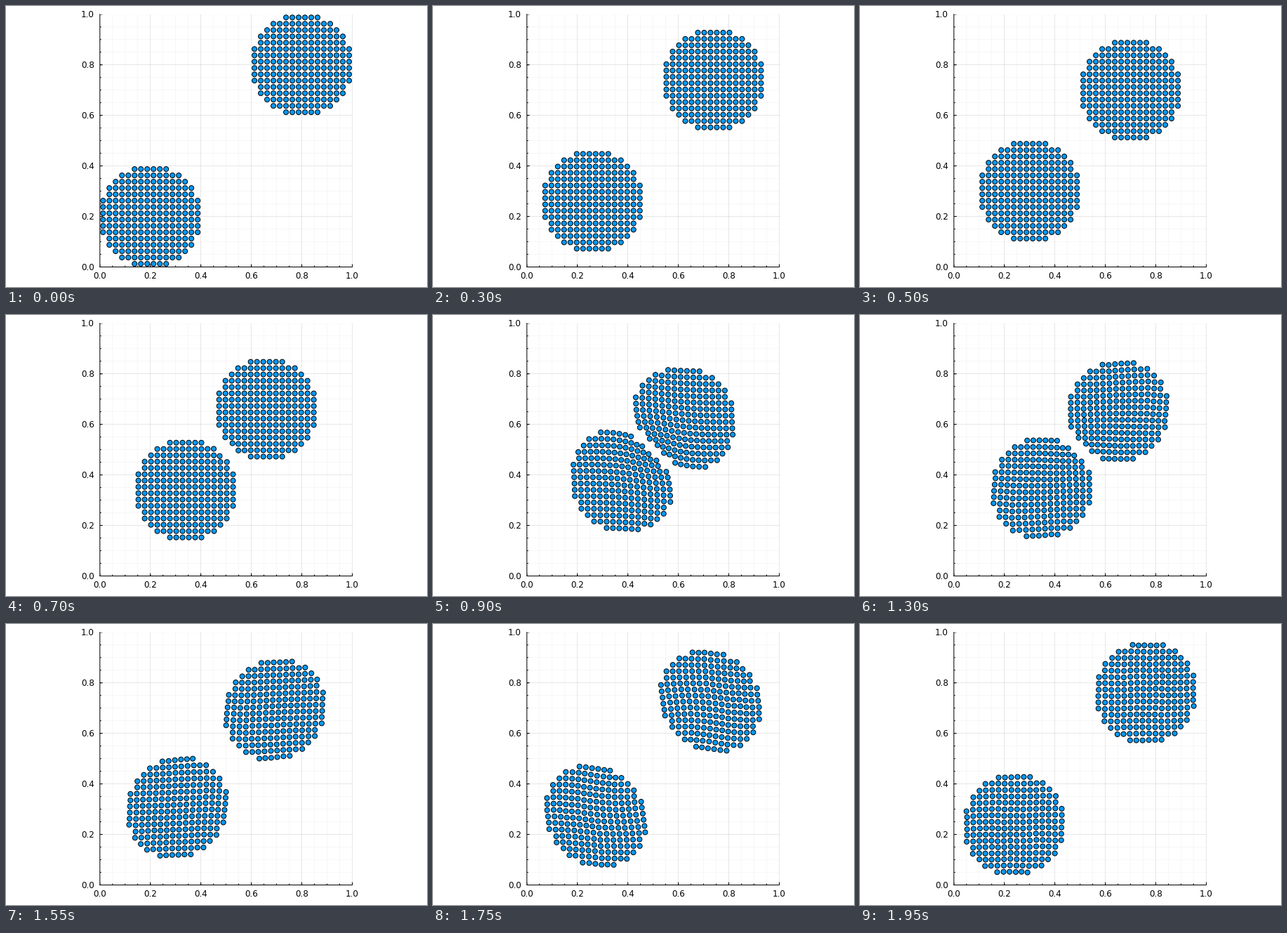
Recreate the animation shown at these times as a matplotlib script. Size 600 by 400 pixels, loop 2000 ms.

```python
"""Two elastic discs collide: material point method on a 20 x 20 grid."""
import numpy as np
import matplotlib.pyplot as plt
from matplotlib.animation import FuncAnimation
from matplotlib.collections import EllipseCollection

FRAMES, INTERVAL = 40, 50
STEPS, DT = 100, 1e-3             # solver steps per frame

CELLS, H = 20, 0.05
NODES = CELLS + 1
SPACING, RADIUS, SPEED = H / 2, 0.2, 0.1
YOUNG, NU, RHO = 1000.0, 0.3, 1000.0
VOLUME = SPACING ** 2
MASS = RHO * VOLUME
EPS = 1e-9
MIN_MASS = 2e-3 * MASS            # lighter nodes carry no force

PX = 0.72                         # points per pixel at 100 dpi
LEFT, RIGHT, TOP, BOTTOM = 133.8, 493.5, 11.8, 371.5


def disc(center):
    """Regular lattice of particles inside a circle."""
    ticks = np.arange(SPACING / 2, 1, SPACING)
    pts = np.stack(np.meshgrid(ticks, ticks, indexing="ij"), -1).reshape(-1, 2)
    return pts[np.hypot(*(pts - center).T) < RADIUS]


def shape(pos):
    """Bilinear weights, their gradients and the four nodes per particle."""
    cell = np.clip(np.floor(pos / H).astype(int), 0, CELLS - 1)
    t = np.clip(pos / H - cell, EPS, 1 - EPS)
    wx, wy = (np.stack([1 - t[:, a], t[:, a]]) for a in (0, 1))
    slope = np.array([-1, 1]) / H
    n = len(pos)
    w = (wx[:, None] * wy[None]).reshape(4, n)
    gx = (slope[:, None, None] * wy[None]).reshape(4, n)
    gy = (wx[:, None] * slope[None, :, None]).reshape(4, n)
    ix = cell[:, 0] + np.arange(2)[:, None, None]
    iy = cell[:, 1] + np.arange(2)[None, :, None]
    return w, gx, gy, (ix * NODES + iy).reshape(4, n)


def simulate(pos, vel):
    """Particle positions at the start of every frame."""
    pos, vel = pos.copy(), vel.copy()
    sxx, syy, sxy = np.zeros((3, len(pos)))
    vol = np.full(len(pos), VOLUME)
    stiff = YOUNG / (1 + NU) / (1 - 2 * NU)
    states = [pos.copy()]
    for step in range(1, (FRAMES - 1) * STEPS + 1):
        w, gx, gy, node = shape(pos)
        flat = node.ravel()

        def to_grid(values):
            return np.bincount(flat, values.ravel(), NODES ** 2)

        mass = to_grid(w * MASS)
        inv = 1 / np.maximum(mass, 1e-30)
        push = np.where(mass > MIN_MASS, inv, 0)
        acc_x = -to_grid(vol * (gx * sxx + gy * sxy)) * push
        acc_y = -to_grid(vol * (gx * sxy + gy * syy)) * push
        ux = to_grid(w * MASS * vel[:, 0]) * inv + DT * acc_x
        uy = to_grid(w * MASS * vel[:, 1]) * inv + DT * acc_y

        ux, uy = ux[node], uy[node]
        vel[:, 0] += DT * (w * acc_x[node]).sum(0)
        vel[:, 1] += DT * (w * acc_y[node]).sum(0)
        pos[:, 0] += DT * (w * ux).sum(0)
        pos[:, 1] += DT * (w * uy).sum(0)

        exx, exy = DT * (gx * ux).sum(0), DT * (gy * ux).sum(0)
        eyx, eyy = DT * (gx * uy).sum(0), DT * (gy * uy).sum(0)
        sxx += stiff * ((1 - NU) * exx + NU * eyy)
        syy += stiff * ((1 - NU) * eyy + NU * exx)
        # Soft in shear: acts on the mean of both shear terms.
        sxy += stiff * (0.5 - NU) * (exy + eyx) / 2
        vol *= (1 + exx) * (1 + eyy) - exy * eyx

        if step % STEPS == 0:
            states.append(pos.copy())
    return states


def rule(ax, at, length, alpha=1.0, width=1.0):
    """Lines of equal length rising from both axes."""
    style = dict(colors="black", alpha=alpha, lw=width * PX, snap=False,
                 zorder=1)
    ax.vlines(at, 0, length, **style)
    ax.hlines(at, 0, length, **style)


def label(ax, text, at, shift, align):
    ax.annotate(text, at, np.multiply(shift, PX), textcoords="offset points",
                ha=align, va="baseline", fontsize=12 * PX,
                annotation_clip=False)


low, high = disc((0.2, 0.2)), disc((0.8, 0.8))
home = np.vstack([low, high])
start = np.vstack([np.full_like(low, SPEED), np.full_like(high, -SPEED)])
states = simulate(home, start)

plt.rcParams["font.family"] = "DejaVu Sans"
fig = plt.figure(figsize=(6, 4), dpi=100, facecolor="white")
ax = fig.add_axes([LEFT / 600, 1 - BOTTOM / 400,
                   (RIGHT - LEFT) / 600, (BOTTOM - TOP) / 400])
ax.set(xticks=[], yticks=[])
ax.spines[["top", "right"]].set_visible(False)
for side in ("left", "bottom"):
    ax.spines[side].set(linewidth=PX, snap=False)

major = np.arange(6) / 5
minor = np.arange(21) / 20
rule(ax, major, 1, alpha=0.1, width=0.6)
rule(ax, minor, 1, alpha=0.05, width=0.6)
rule(ax, major, 4 / (RIGHT - LEFT))
rule(ax, minor, 2 / (RIGHT - LEFT))
for v in major:
    label(ax, f"{v:.1f}", (v, 0), (0, -16), "center")
    label(ax, f"{v:.1f}", (0, v), (-8, -4.2), "right")
ax.set(xlim=(0, 1), ylim=(0, 1))

size = np.full(len(home), 7.0)
dots = EllipseCollection(size, size, np.zeros_like(size), units="dots",
                         offsets=home, offset_transform=ax.transData,
                         facecolors="#009afa", edgecolors="black",
                         linewidths=PX, zorder=3)
ax.add_collection(dots, autolim=False)


def update(i):
    dots.set_offsets(states[i])
    return (dots,)


anim = FuncAnimation(fig, update, frames=FRAMES, interval=INTERVAL,
                     repeat=True, repeat_delay=0, blit=False)
plt.show()
```
